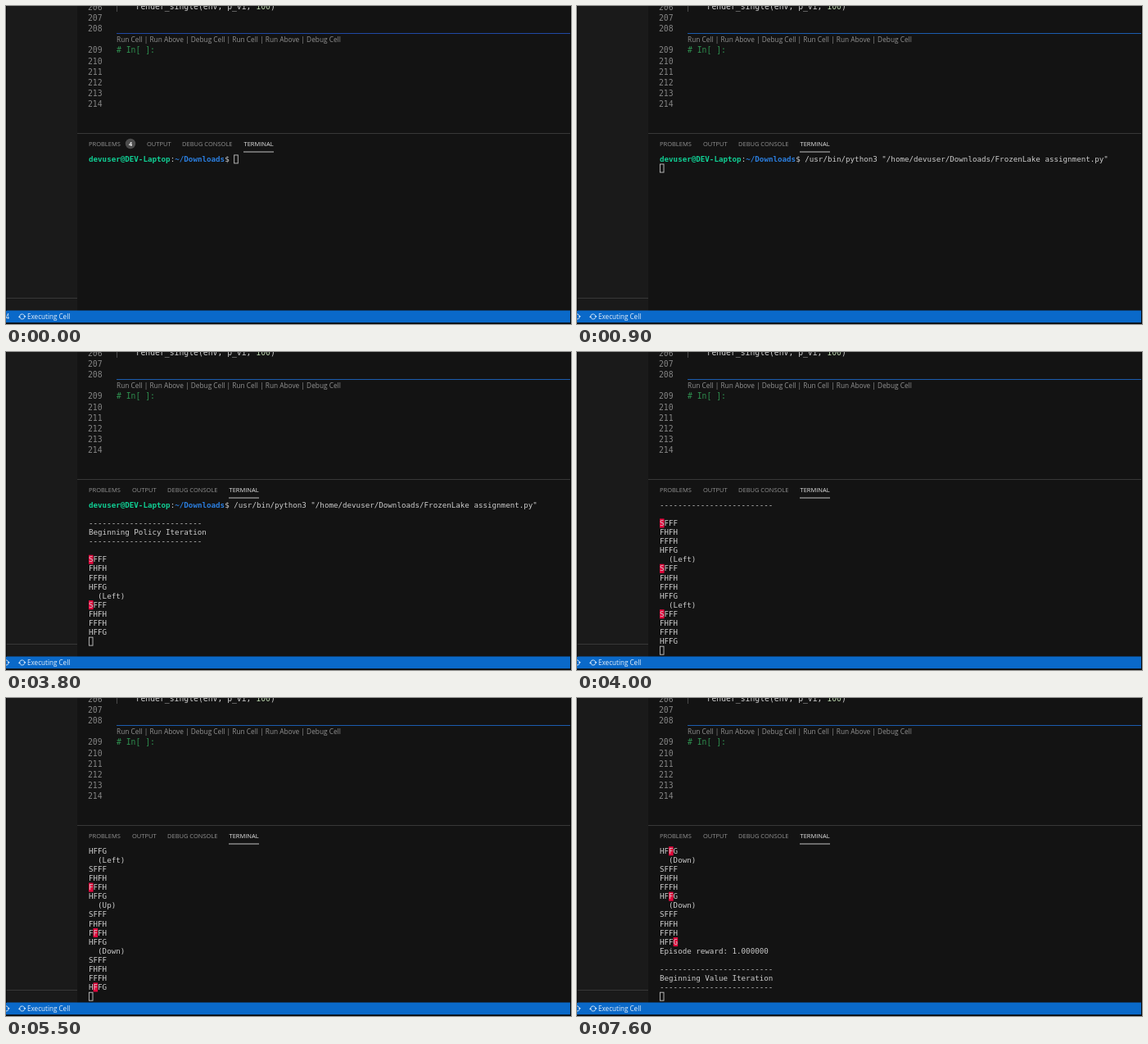
An HTML page with a canvas that plays this animation: 690 by 388 pixels, repeating every 8 s.

```html
<!DOCTYPE html>
<html lang="en">
<head>
<meta charset="utf-8">
<title>Terminal session</title>
<style>
html, body { margin: 0; width: 100%; height: 100%; overflow: hidden; background: #131313; }
canvas { display: block; }
</style>
</head>
<body>
<canvas id="stage" width="690" height="388"></canvas>
<script>
const ctx = document.getElementById('stage').getContext('2d');
const MONO = '"DejaVu Sans Mono", monospace';
const SANS = '"Open Sans", "Noto Sans", sans-serif';
const LOOP = 8000;

// Terminal metrics
const LEFT = 101, TOP = 181.2, ROW = 11.08, ROWS = 17, CHAR = 5.54;
const TERM_FONT = `9.2px ${MONO}`;

const USER = 'devuser', HOST = 'DEV-Laptop';
const COMMAND = ` /usr/bin/python3 "/home/${USER}/Downloads/FrozenLake assignment.py"`;
const LAKE = ['SFFF', 'FHFH', 'FFFH', 'HFFG'];
const POLICY = { 0: 'Left', 4: 'Left', 8: 'Up', 9: 'Down', 13: 'Right', 14: 'Down' };
const WALK = [0, 0, 0, 0, 4, 4, 8, 9, 13, 14, 14, 14, 15];
const START = 100, POLICY_AT = 2400, WALK_AT = 3500, STEP = 250;

function banner(title) {
  const rule = '-'.repeat(25);
  return ['', rule, `Beginning ${title} Iteration`, rule];
}

function terminalLines(time) {
  const lines = [{ prompt: true, command: time >= START ? COMMAND : '' }];
  if (time >= POLICY_AT) lines.push(...banner('Policy'));
  WALK.forEach((cell, i) => {
    if (time < WALK_AT + i * STEP) return;
    lines.push(i ? `  (${POLICY[WALK[i - 1]]})` : '');
    LAKE.forEach((text, row) =>
      lines.push(row === cell >> 2 ? { text, mark: cell & 3 } : text));
    if (i === WALK.length - 1) {
      lines.push('Episode reward: 1.000000', ...banner('Value'));
    }
  });
  if (time >= START) lines.push('');
  return lines.slice(-ROWS);
}

function rect(x, y, w, h, color) {
  ctx.fillStyle = color;
  ctx.fillRect(x, y, w, h);
}

function text(string, x, y, color, font) {
  ctx.font = font;
  ctx.fillStyle = color;
  ctx.fillText(string, x, y);
}

function syncIcon(x, y, angle) {
  ctx.save();
  ctx.translate(x, y);
  ctx.rotate(angle);
  ctx.strokeStyle = ctx.fillStyle = '#dcebfa';
  ctx.lineWidth = 0.9;
  for (let half = 0; half < 2; half++) {
    ctx.beginPath();
    ctx.arc(0, 0, 3.1, Math.PI * 1.08, Math.PI * 1.88);
    ctx.stroke();
    ctx.beginPath();
    ctx.moveTo(1.6, -0.9);
    ctx.lineTo(4.6, -0.9);
    ctx.lineTo(3.4, 1.3);
    ctx.fill();
    ctx.rotate(Math.PI);
  }
  ctx.restore();
}

function drawEditor(running) {
  const font = `9.75px ${MONO}`;
  for (let n = 206; n <= 214; n++) {
    const y = 4.6 + (n - 206 + (n > 208)) * 13.18;
    text(n, 100, y, '#858585', font);
  }
  rect(135, 0, 1, 7, '#4a4a4a');
  text('render_single(env, p_vi, ', 158.6, 4.2, '#cccccc', font);
  text('100', 305.3, 4.2, '#b5cea8', font);
  text(')', 322.9, 4.2, '#cccccc', font);
  rect(135, 33, 554, 1, running ? '#1c5cae' : '#2149a5');
  const lens = 'Run Cell | Run Above | Debug Cell';
  text(`${lens} | ${lens}`, 135, 44.3, '#929292', `8.3px ${SANS}`);
  text('# In[ ]:', 135, 57, '#2f9150', font);
}

function drawTabs(running) {
  const font = `7.5px ${SANS}`;
  const shift = running ? 0 : 18;
  rect(87, 155, 602, 1, '#383838');
  text('PROBLEMS', 101, 170.7, '#929292', font);
  if (!running) {
    ctx.fillStyle = '#4d4d4d';
    ctx.beginPath();
    ctx.arc(152, 168, 6.2, 0, Math.PI * 2);
    ctx.fill();
    text('4', 149.9, 170.7, '#f0f0f0', `bold 7.3px ${SANS}`);
  }
  text('OUTPUT', 154 + shift, 170.7, '#929292', font);
  text('DEBUG CONSOLE', 197 + shift, 170.7, '#929292', font);
  text('TERMINAL', 272.5 + shift, 170.7, '#e4e4e4', font);
  rect(272 + shift, 177.5, 37, 1, '#c4c4c4');
}

function drawPrompt(command, y) {
  const bold = `bold ${TERM_FONT}`;
  const parts = [
    [`${USER}@${HOST}`, '#10cf94', bold],
    [':', '#cccccc', TERM_FONT],
    ['~/Downloads', '#2b7fe0', bold],
    ['$' + command, '#cccccc', TERM_FONT]
  ];
  let column = 0;
  for (const [string, color, font] of parts) {
    text(string, LEFT + column * CHAR, y, color, font);
    column += string.length;
  }
  return column;
}

function drawTerminal(time) {
  const lines = terminalLines(time);
  let column = 0;
  lines.forEach((line, i) => {
    const top = TOP + i * ROW, base = top + 8.7;
    column = 0;
    if (line.prompt) {
      column = drawPrompt(line.command, base) + 1;
      return;
    }
    if (line.mark !== undefined) {
      rect(LEFT + line.mark * CHAR, top, CHAR, ROW, '#e3063c');
    }
    text(line.text || line, LEFT, base, '#cccccc', TERM_FONT);
  });
  ctx.strokeStyle = '#c4c4c4';
  ctx.lineWidth = 0.9;
  ctx.strokeRect(LEFT + column * CHAR + 0.4, TOP + (lines.length - 1) * ROW + 0.7, 4.6, 10);
}

function draw(now) {
  const time = now % LOOP;
  const running = time >= START;
  const angle = time >= 1200 && time < 3100 ? Math.PI / 2 : 0;

  rect(0, 0, 690, 388, '#131313');
  rect(0, 0, 87, 372, '#1a1a1a');
  rect(0, 356, 87, 1, '#383838');
  drawEditor(running);
  drawTabs(running);
  drawTerminal(time);

  rect(0, 371.5, 690, 15, '#0a69c9');
  if (running) syncIcon(0, 379, angle);
  else text('4', -0.5, 381.8, '#e8f1fa', `8.15px ${SANS}`);
  syncIcon(19.7, 379, angle);
  text('Executing Cell', 26, 381.8, '#e8f1fa', `8.15px ${SANS}`);
  rect(0, 386.5, 690, 1.5, '#080808');
  rect(0, 0, 0.7, 372, '#080808');
  rect(689, 0, 1, 388, '#080808');
  requestAnimationFrame(draw);
}
requestAnimationFrame(draw);
</script>
</body>
</html>
```
